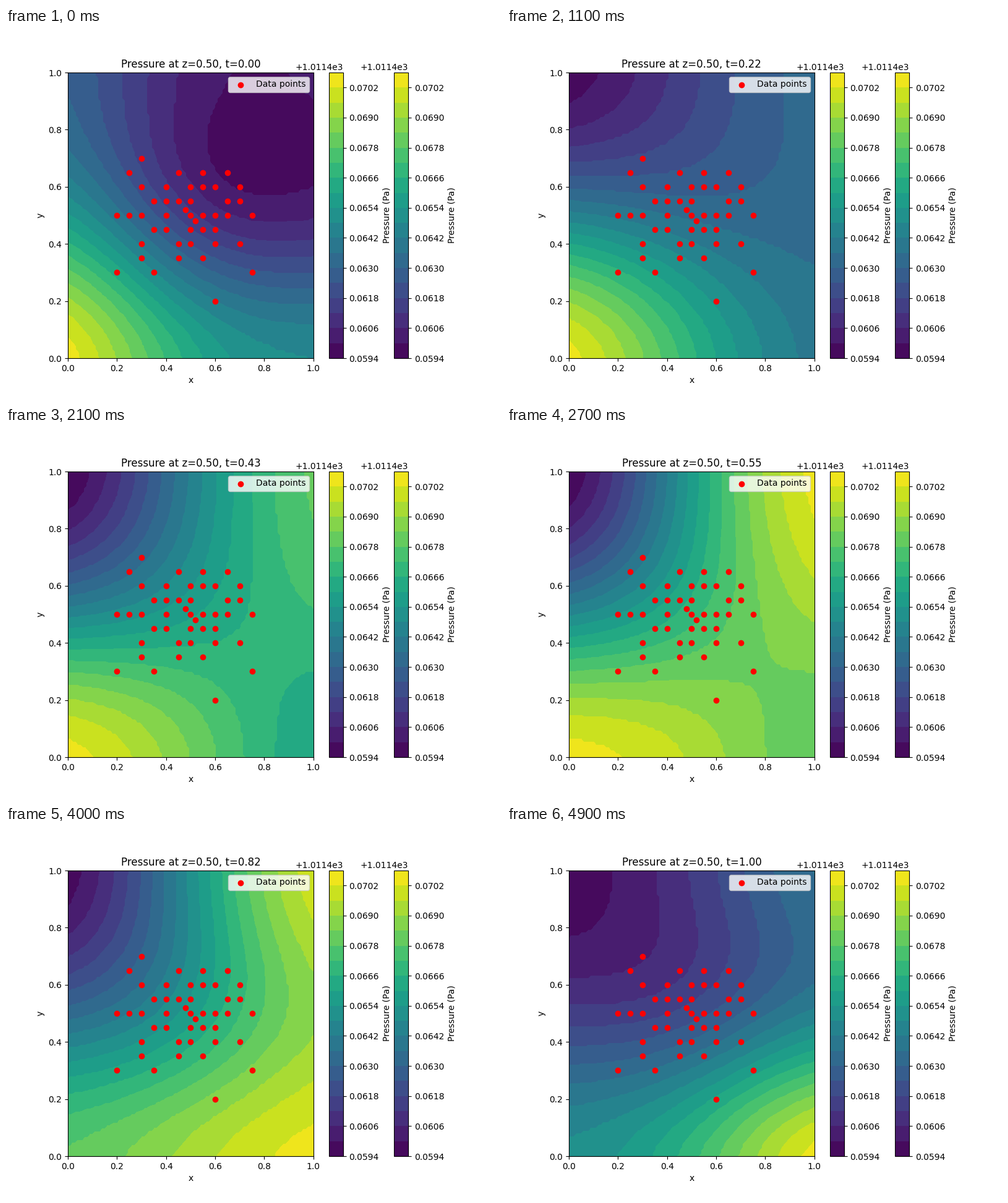
A matplotlib script that plays this animation: 800 px wide and 600 px high, repeating every 5 s.

```python
import numpy as np
import matplotlib.pyplot as plt
from matplotlib.animation import FuncAnimation

FRAMES, INTERVAL = 50, 100
BASE, STEP, BANDS = 1011.4594, 0.0006, 19
LEVELS = np.round(BASE + STEP * np.arange(BANDS + 1), 4)

# Pressure in contour steps at the corners, edge midpoints and centre.
# Rows run from y=0 to y=1, columns from x=0 to x=1.
KEY_POSES = {
    0.00: [[18.9, 12.0, 9.5], [10.6, 3.8, 2.4], [6.4, 2.2, 1.7]],
    0.35: [[18.3, 13.8, 9.5], [8.5, 9.4, 10.5], [0.0, 6.5, 11.2]],
    0.70: [[15.5, 16.2, 15.9], [7.5, 11.7, 16.3], [0.4, 10.2, 18.6]],
    1.00: [[9.6, 12.9, 18.7], [3.7, 4.8, 8.6], [0.7, 3.4, 7.3]],
}
# One cubic in time through the poses for each node.
motion = np.polyfit(list(KEY_POSES), np.reshape(list(KEY_POSES.values()), (4, 9)), 3)

# Sensor positions: the x values on each row y.
SENSORS = {
    0.70: [0.3],
    0.65: [0.25, 0.45, 0.55, 0.65],
    0.60: [0.3, 0.4, 0.5, 0.55, 0.6, 0.7],
    0.55: [0.35, 0.4, 0.45, 0.5, 0.65, 0.7],
    0.52: [0.48],
    0.50: [0.2, 0.25, 0.3, 0.4, 0.5, 0.55, 0.6, 0.65, 0.75],
    0.48: [0.52],
    0.45: [0.35, 0.4, 0.5, 0.55, 0.6],
    0.40: [0.3, 0.45, 0.5, 0.6, 0.7],
    0.35: [0.3, 0.45, 0.55],
    0.30: [0.2, 0.35, 0.75],
    0.20: [0.6],
}


def node_weights(s, bend):
    """Quadratic weights of the nodes 0, 0.5 and 1, flattened towards the ends."""
    u = np.sin(bend * (s - 0.5)) / np.sin(bend / 2)
    return np.stack([(u * u - u) / 2, 1 - u * u, (u * u + u) / 2], axis=1)


grid = np.linspace(0, 1, 100)
x_weights = node_weights(grid, 2.3)
y_weights = node_weights(grid, 2.9)


def pressure(t):
    nodes = (t ** np.arange(3, -1, -1) @ motion).reshape(3, 3)
    field = np.clip(y_weights @ nodes @ x_weights.T, 0.2, BANDS - 0.2)
    # Every moment spans the whole colour scale.
    field = np.interp(field, [field.min(), field.max()], [0.4, BANDS - 0.6])
    # Single precision gives the contours their ragged edges.
    return np.float32(BASE + STEP * field)


def draw_contours(t):
    return ax.contourf(grid, grid, pressure(t), levels=LEVELS, cmap="viridis")


fig, ax = plt.subplots(figsize=(8, 6), dpi=100)
current = [draw_contours(0)]
for _ in range(2):
    fig.colorbar(current[0], ax=ax, label="Pressure (Pa)")

points = [(x, y) for y, xs in SENSORS.items() for x in xs]
ax.scatter(*zip(*points), color="red", label="Data points", zorder=2)
ax.set(xlim=(0, 1), ylim=(0, 1), xlabel="x", ylabel="y")
ax.legend(loc="upper right")


def update(frame):
    t = frame / (FRAMES - 1)
    current[0].remove()
    current[0] = draw_contours(t)
    ax.set_title(f"Pressure at z=0.50, t={t:.2f}")


anim = FuncAnimation(fig, update, frames=FRAMES, interval=INTERVAL, repeat=True)
plt.show()
```
